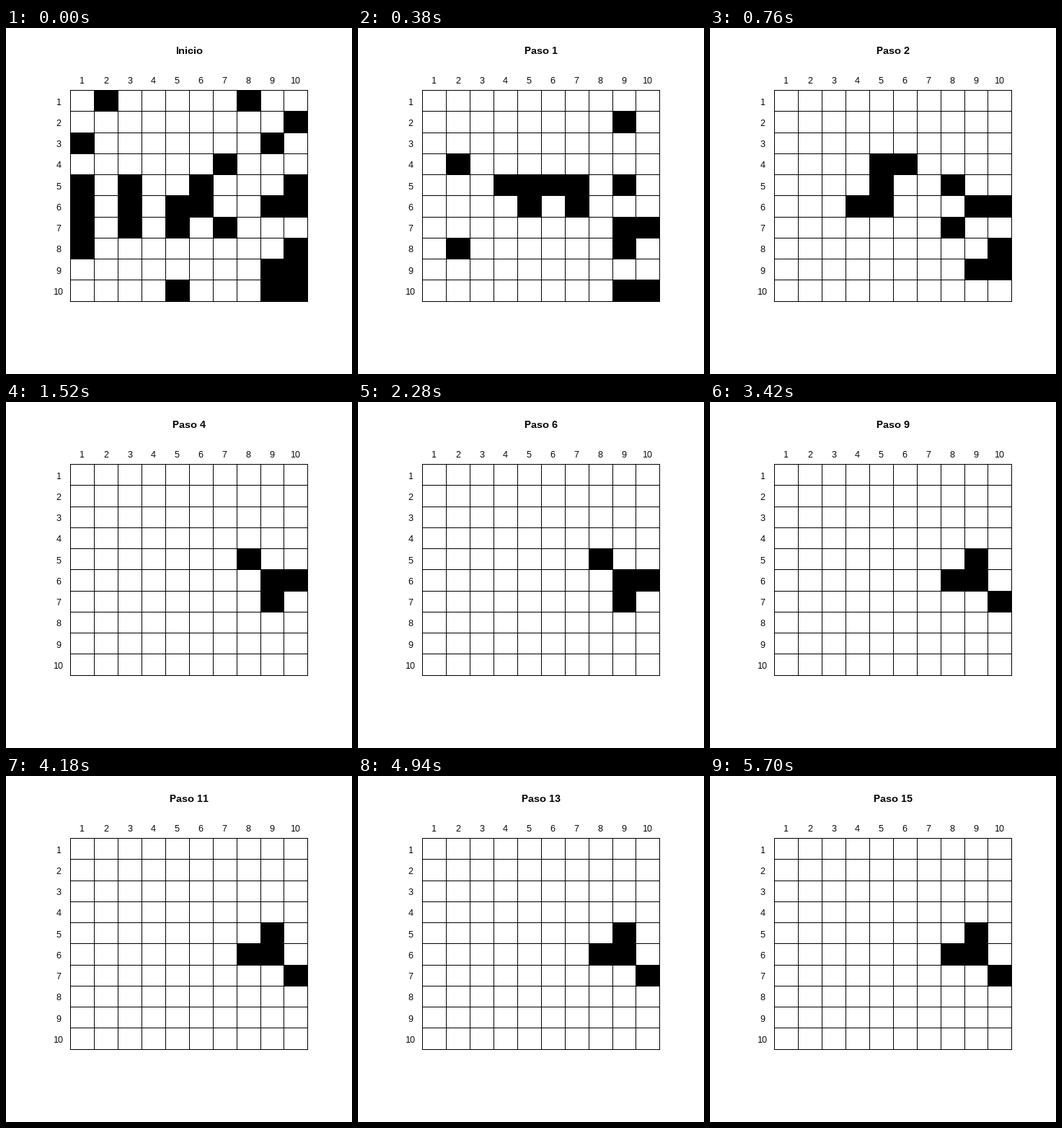
Recreate the animation shown at these times as a matplotlib script. Size 480 by 480 pixels, loop 6.08 s.

```python
import matplotlib.pyplot as plt
import numpy as np
from matplotlib.animation import FuncAnimation
from matplotlib.patches import Rectangle

SIZE, DPI = 480, 100
N, STEPS, STEP_MS = 10, 16, 380
PX = 72 / DPI  # points per pixel
X0, DX = 73.51, 32.889  # position of index 0 and cell pitch
Y0, DY = 71.91, 29.2525

START = ["0100000100", "0000000001", "1000000010", "0000001000", "1010010001",
         "1010110011", "1010101000", "1000000001", "0000000011", "0000100011"]

plt.rcParams["font.family"] = "Liberation Sans"
plt.rcParams["text.hinting"] = "default"
plt.rcParams["text.hinting_factor"] = 1


def evolve(grid):
    """A cell lives next exactly when it has three live neighbours."""
    pad = np.pad(grid, 1)
    block = sum(pad[r:r + N, c:c + N] for r in range(3) for c in range(3))
    return (block - grid == 3).astype(int)


states = [np.array([[int(ch) for ch in row] for row in START])]
while len(states) < STEPS:
    states.append(evolve(states[-1]))

edges = np.arange(N + 1) + 0.5
xs = np.floor(X0 + DX * edges)
ys = np.floor(Y0 + DY * edges)

fig = plt.figure(figsize=(SIZE / DPI, SIZE / DPI), dpi=DPI, facecolor="white")
ax = fig.add_axes([0, 0, 1, 1])
ax.set_xlim(0, SIZE)
ax.set_ylim(SIZE, 0)
ax.axis("off")


def box(x, y, w, h):
    return ax.add_patch(Rectangle((x, y), w, h, fc="black", lw=0))


def label(x, y, text, px=12, **style):
    return ax.text(x, y, text, size=px * PX, ha="center", va="baseline", **style)


for x in xs:
    box(x, ys[0], 1, ys[-1] - ys[0] + 1)
for y in ys:
    box(xs[0], y, xs[-1] - xs[0] + 1, 1)

cells = [[box(xs[c], ys[r], xs[c + 1] - xs[c] + 1, ys[r + 1] - ys[r] + 1)
          for c in range(N)] for r in range(N)]

for k in range(1, N + 1):
    label(X0 + DX * k - 0.5, 77, str(k))
    label(X0 - 0.5, np.floor(Y0 + DY * k + 5.9), str(k))

title = label(254.4, 36, "", px=14.4, weight="bold")


def draw(step):
    title.set_text(f"Paso {step}" if step else "Inicio")
    for r in range(N):
        for c in range(N):
            cells[r][c].set_visible(bool(states[step][r, c]))
    return [title]


anim = FuncAnimation(fig, draw, frames=STEPS, interval=STEP_MS,
                     repeat=True, repeat_delay=0, blit=False)
plt.show()
```
